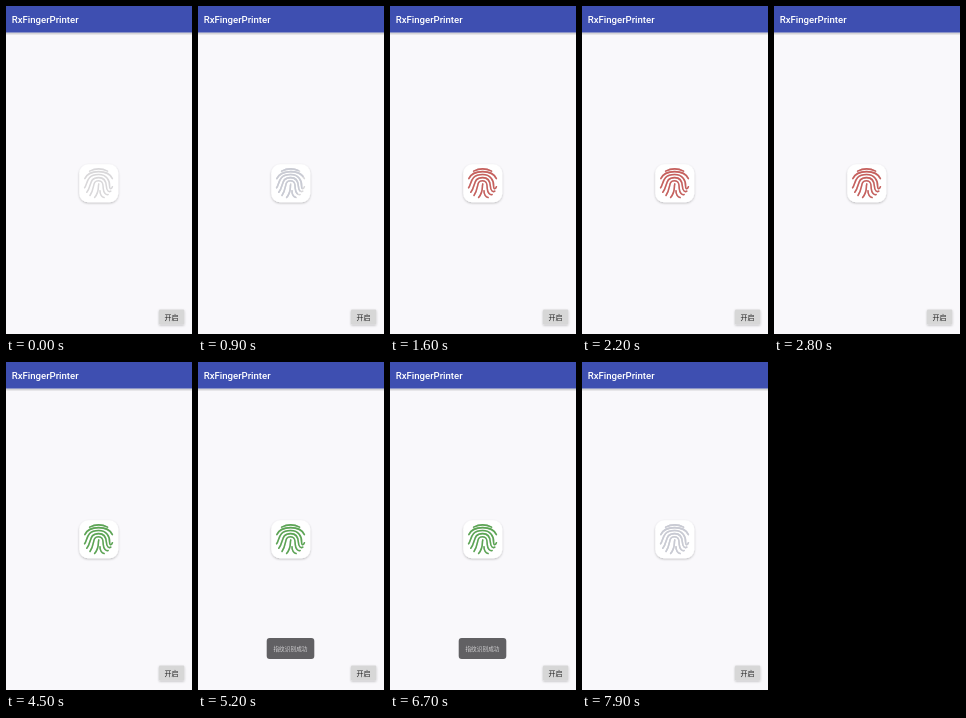
An HTML page for the animation above (8 s loop, 186 px wide and 328 px high).

```html
<!DOCTYPE html>
<html lang="zh">
<meta charset="utf-8">
<style>
  html, body { margin: 0; width: 100%; height: 100%; overflow: hidden; background: #f9f8fb; }
  svg { display: block; width: 186px; height: 328px; }
  text { font-family: Roboto, "Noto Sans CJK SC", "Noto Sans CJK", sans-serif; }
  .ridges { fill: none; stroke-width: 1.55; stroke-linecap: round; }
</style>
<svg viewBox="0 0 186 328">
  <defs>
    <linearGradient id="fade" x2="0" y2="1">
      <stop stop-color="#000" stop-opacity=".22"/>
      <stop offset="1" stop-color="#000" stop-opacity="0"/>
    </linearGradient>
    <filter id="shadow" x="-30%" y="-30%" width="160%" height="160%">
      <feDropShadow dx="0" dy="1" stdDeviation="1.2" flood-opacity=".25"/>
    </filter>
  </defs>
  <rect width="186" height="328" fill="#f9f8fb"/>
  <rect y="26.5" width="186" height="3" fill="url(#fade)"/>
  <rect width="186" height="26.5" fill="#3e4fb1"/>
  <text x="5.7" y="17" font-size="9.6" font-weight="500" fill="#fff">RxFingerPrinter</text>

  <rect x="73.3" y="158.3" width="39" height="38" rx="9" fill="#fff" filter="url(#shadow)"/>
  <g transform="translate(92.6 177.3)">
    <g id="base" class="ridges" stroke="#d9d8da"></g>
    <g id="ink" class="ridges"></g>
  </g>

  <g id="toast">
    <rect x="68.7" y="276" width="47.6" height="21" rx="3" fill="#616063"/>
    <text x="92.5" y="288.7" font-size="5.7" text-anchor="middle" fill="#d2d1d3">指纹识别成功</text>
  </g>

  <rect id="button" x="153" y="303.5" width="25.3" height="15" rx="1" filter="url(#shadow)"/>
  <text x="165.6" y="313.5" font-size="7" text-anchor="middle" fill="#222">开启</text>
</svg>
<script>
  const $ = id => document.getElementById(id);
  const ridges = [
    'M-9 -12.2Q0 -16.6 9 -12.2',
    'M-13.8 -4.7C-9.5 -14 9.5 -14 13.8 -4.7',
    'M-14 4.5C-11 1 -12.5 -8.8 0 -8.8C8 -8.8 11.3 -3 11 3C11 6.2 13 6 13.8 3.5',
    'M-11.8 9C-6.8 3 -10 -5.7 0 -5.7C6 -5.7 7.6 -1 7.8 3C8 8 10.5 9 12.2 7.8',
    'M-8.6 12.2C-3.3 5 -7 -2.6 0 -2.6C5 -2.6 4.4 2 4.6 5C5 10 7.5 11.8 9.5 11.3',
    'M-4 14.2C1.3 8 -1 4 .2 .6',
    'M1.4 7.5C1.2 11 3.2 13.8 5.5 14.2'
  ];
  for (const d of ridges) {
    const path = `<path d="${d}" pathLength="1"/>`;
    $('base').insertAdjacentHTML('beforeend', path);
    $('ink').insertAdjacentHTML('beforeend', path);
  }

  // Each state starts tracing the ridges in its own colour.
  const states = [
    { at: 350, span: 600, color: '#c9cbd4' },
    { at: 950, span: 550, color: '#c8605d' },
    { at: 2850, span: 550, color: '#5ca654' },
    { at: 7300, span: 600, color: '#c9cbd4' }
  ];
  const clamp = v => Math.max(0, Math.min(1, v));
  const ramp = (t, start, span) => clamp((t - start) / span);
  const press = (t, start) => ramp(t, start, 100) - ramp(t, start + 150, 250);

  function draw(now) {
    const t = now % 8000;
    const state = states.filter(s => t >= s.at).pop();
    const ink = $('ink');
    ink.style.display = state ? '' : 'none';
    if (state) {
      const p = ramp(t, state.at, state.span);
      ink.setAttribute('stroke', state.color);
      ink.setAttribute('stroke-dasharray', p < 1 ? `${p} 2` : 'none');
    }
    $('toast').setAttribute('opacity', ramp(t, 4700, 300) - ramp(t, 7000, 300));
    const shade = 215 - 24 * (press(t, 150) + press(t, 7150));
    $('button').setAttribute('fill', `rgb(${shade},${shade},${shade})`);
    requestAnimationFrame(draw);
  }
  requestAnimationFrame(draw);
</script>
</html>
```
